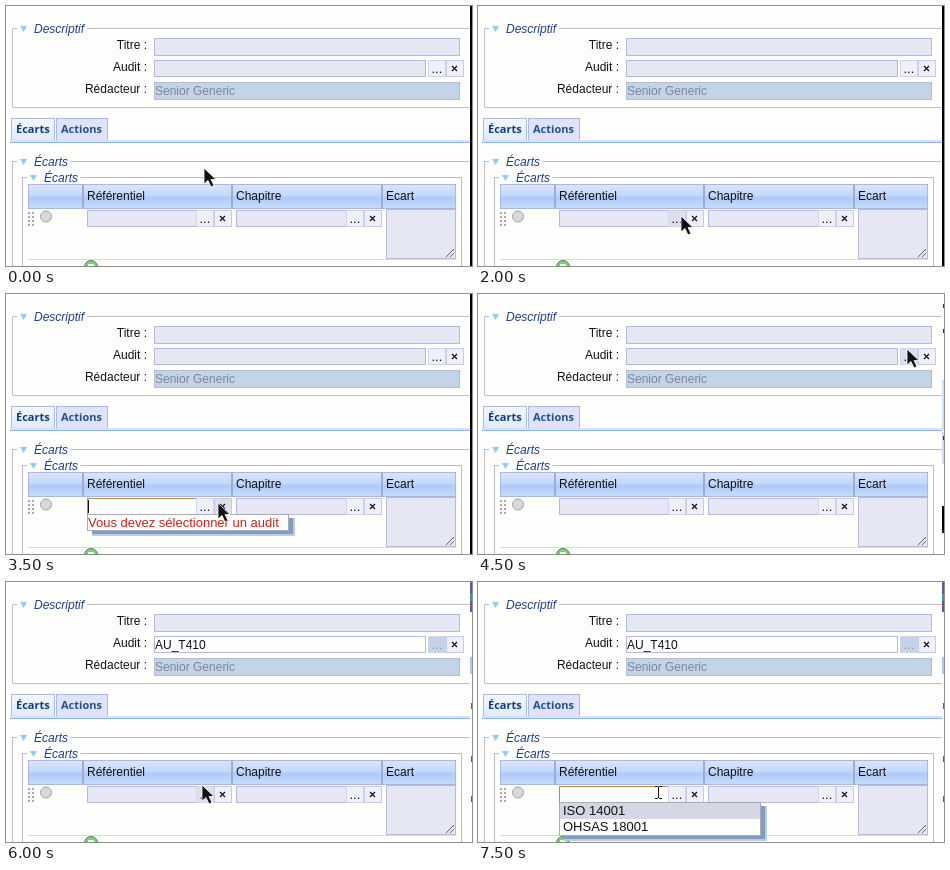
Animation, 466 px wide and 260 px high, one loop 8000 ms. Source, as an HTML page:

```html
<!DOCTYPE html>
<html lang="fr">
<head>
<meta charset="utf-8">
<title>Formulaire d'audit</title>
<style>
html, body { margin: 0; width: 100%; height: 100%; overflow: hidden; background: #fefefd; }
svg { display: block; width: 466px; height: 260px; font: 12px "Liberation Sans", Arial, sans-serif; }
text { white-space: pre; }
.tab { font: bold 11px "Open Sans", sans-serif; }
.legend { font-style: italic; paint-order: stroke; stroke: #fefefd; stroke-width: 5px; }
.big { font-size: 13px; }
</style>
</head>
<body>
<svg id="stage" viewBox="0 0 466 260" xmlns="http://www.w3.org/2000/svg">
  <defs>
    <linearGradient id="head" x2="0" y2="1">
      <stop offset="0" stop-color="#dfe4fb"/>
      <stop offset=".45" stop-color="#c3d8fa"/>
      <stop offset=".55" stop-color="#aecbf6"/>
      <stop offset="1" stop-color="#c6dcfb"/>
    </linearGradient>
    <linearGradient id="tab" x2="0" y2="1">
      <stop offset="0" stop-color="#f3f7ff"/>
      <stop offset="1" stop-color="#dcecfc"/>
    </linearGradient>
  </defs>
</svg>
<script>
const LOOP = 8000, STEP = 500;
const FIELD = '#e6e7f5', LOCKED = '#c3d4e6', BUTTON = '#f0f0fc', HOVER = '#dcdff0';
const EDGE = '#b6b9dc', PAGE = '#fefefd';
const stage = document.getElementById('stage');

function add(tag, attrs, parent = stage, content = '') {
  const el = document.createElementNS(stage.namespaceURI, tag);
  for (const key in attrs) el.setAttribute(key, attrs[key]);
  el.textContent = content;
  parent.append(el);
  return el;
}
const set = (el, attrs) => { for (const key in attrs) el.setAttribute(key, attrs[key]); };
const show = (el, on) => el.setAttribute('visibility', on ? 'visible' : 'hidden');
const group = () => add('g', {});
const path = (d, attrs, parent) => add('path', { d, fill: 'none', ...attrs }, parent);
const fill = (x, y, width, height, color, parent) => add('rect', { x, y, width, height, fill: color }, parent);
const box = (x, y, w, h, color, edge = EDGE, parent) =>
  add('rect', { x: x + .5, y: y + .5, width: w - 1, height: h - 1, fill: color, stroke: edge }, parent);
const text = (x, y, str, attrs = {}, parent) => add('text', { x, y, fill: '#111', ...attrs }, parent, str);

function fieldset(x, y, right, bottom, title) {
  box(x, y, right - x, bottom - y, 'none', '#bcbecb');
  fill(x + 5, y - 2, 18, 5, PAGE);
  path(`M${x + 8} ${y - 2}h7l-3.500 6z`, { fill: '#8fcdf0' });
  text(x + 22, y + 5, title, { class: 'legend', fill: '#1f3c90' });
}

// Search input followed by its "open" and "clear" buttons.
function picker(x, y, width, buttonX) {
  const input = box(x, y, width, 17, FIELD);
  const open = box(buttonX, y, 18, 17, BUTTON, '#d2d4ec');
  const dots = text(buttonX + 3.5, y + 13, '...', { class: 'big' });
  const clear = box(buttonX + 18, y, 18, 17, BUTTON, '#c6c9e8');
  path(`M${buttonX + 24} ${y + 6}l5 5m0 -5l-5 5`, { stroke: '#111', 'stroke-width': 1.2 });
  return { input, open, dots, clear };
}

fill(0, 0, 466, 260, PAGE);

fieldset(6, 22, 480, 102, 'Descriptif');
[['Titre :', 43], ['Audit :', 65], ['Rédacteur :', 87]].forEach(([label, y]) =>
  text(141, y, label, { 'text-anchor': 'end' }));
box(148, 32, 306, 18, FIELD);
const audit = picker(148, 54, 272, 422);
const auditValue = text(149, 67, 'AU_T410');
box(148, 76, 306, 18, LOCKED);
text(149, 89, 'Senior Generic', { fill: '#7f8794' });

box(5, 112, 44, 24, 'url(#tab)', '#a9bbe0');
box(50, 112, 52, 24, '#dfe2fb', '#a9bbe0');
text(10, 127, 'Écarts', { class: 'tab', fill: '#173a7c' });
text(55, 127, 'Actions', { class: 'tab', fill: '#23508c' });
fill(4, 134, 460, 2, '#d3e4fb');
fill(4, 136, 460, 1, '#8fb6ee');

fieldset(6, 155, 480, 270, 'Écarts');
fieldset(16, 171, 456, 270, 'Écarts');
box(22, 178, 428, 25, 'url(#head)', '#a8b8e6');
for (const x of [77, 226, 376]) fill(x - 1, 179, 2, 23, '#9badd8');
[[81, 'Référentiel'], [230, 'Chapitre'], [380, 'Ecart']].forEach(([x, label]) => text(x, 194, label));
fill(22, 253, 428, 1, '#d6dced');
for (let i = 0; i < 8; i++) fill(22 + i % 2 * 4, 206 + (i >> 1) * 4, 2, 2, '#a8a8ae');
add('circle', { cx: 40, cy: 210.5, r: 5.5, fill: '#d8d8d8', stroke: '#a2a2a2' });
const ref = picker(81, 204, 110, 190);
picker(230, 204, 111, 340);
box(380, 203, 70, 50, FIELD);
path('M440 251l8-8m-4 8l4-4', { stroke: '#60646c' });
add('circle', { cx: 85, cy: 261, r: 6.5, fill: '#86c97a', stroke: '#438b48' });
fill(82, 258, 6, 2, '#edf8ed');

const caret = fill(82, 206, 1, 13, '#111');

function popup(height) {
  const g = group();
  fill(86, 224, 203, height + 1, '#bccbe6', g);
  fill(86, 224, 201, height - 1, '#809cc4', g);
  box(81, 220, 202, height, '#fefefe', '#a9abb6', g);
  return g;
}
const warning = popup(17);
text(82, 233, 'Vous devez sélectionner un audit', { class: 'big', fill: '#c4241a' }, warning);
const searching = popup(17);
text(82, 233, 'searching...', { class: 'big', fill: '#aeb8b8' }, searching);
const list = popup(34);
fill(82, 221, 200, 16, '#d3d8e4', list);
text(85, 233, 'ISO 14001', { class: 'big' }, list);
text(85, 249, 'OHSAS 18001', { class: 'big' }, list);

// Sliver of the neighbouring window at the right edge.
fill(464, 0, 2, 260, '#fdfdfd');
const sliver = group();
fill(464, 86, 2, 50, '#cfe2f5', sliver);
fill(464, 138, 2, 32, '#d9d9f7', sliver);
for (const y of [10, 35, 142]) fill(465, y, 1, 4, '#333', sliver);
fill(464, 212, 2, 27, '#000', sliver);
const marks = group();
fill(464, 0, 2, 30, '#71539b', marks);
fill(464, 12, 2, 7, '#3d9d91', marks);
fill(464, 75, 2, 17, '#a9cbed', marks);
for (const y of [121, 174, 214]) fill(465, y, 1, 6, '#4669a5', marks);
const edge = fill(464, 0, 2, 260, '#000');

const arrow = path('M0 0v16l4-3.500 3 6.500 3-1.500-3-6h5z', {
  fill: '#111', stroke: '#fff', 'stroke-width': .8
});
const beam = path('M-3.500-5.500h2.500l1 1 1-1h2.500M0-5v11M-3.500 6.500h2.500l1-1 1 1h2.500', { stroke: '#111' });

// Pointer stops: time, x, y. It travels straight between them.
const stops = [
  [0, 198, 162], [1000, 198, 162], [2000, 203, 210], [2500, 203, 210], [3500, 212, 209],
  [4500, 429, 55], [5000, 429, 55], [6000, 196, 203], [6500, 196, 203], [7500, 180.5, 210]
];
function pointerAt(time) {
  const next = stops.findIndex(([t]) => t > time);
  if (next < 0) return stops.at(-1).slice(1);
  const [t0, x0, y0] = stops[next - 1], [t1, x1, y1] = stops[next];
  const k = (time - t0) / (t1 - t0);
  return [x0 + (x1 - x0) * k, y0 + (y1 - y0) * k];
}

// Each scene lasts until the next start time.
const scenes = [
  { at: 0, edge: true },
  { at: 2000, edge: true, hover: 'open' },
  { at: 2500, menu: warning, hover: 'open' },
  { at: 3000, menu: warning, hover: 'open', edge: true },
  { at: 3500, menu: warning, hover: 'clear', edge: true },
  { at: 4000 },
  { at: 4500, hover: 'audit' },
  { at: 5000, chosen: true },
  { at: 6000, chosen: true, hover: 'open' },
  { at: 6500, chosen: true, pressed: true, menu: searching },
  { at: 7000, chosen: true, menu: list },
  { at: 7500, chosen: true, menu: list, typing: true }
];

function draw(now) {
  const time = Math.floor(now % LOOP / STEP) * STEP;
  const s = scenes.findLast(scene => scene.at <= time);
  const { menu, hover, chosen } = s;
  for (const m of [warning, searching, list]) show(m, m === menu);
  set(ref.input, { fill: menu ? '#fefefe' : FIELD, stroke: menu ? '#b98a4c' : EDGE });
  set(ref.open, { fill: s.pressed ? '#f0ed45' : hover === 'open' ? HOVER : BUTTON });
  set(ref.clear, { fill: hover === 'clear' ? HOVER : BUTTON });
  show(caret, menu && menu !== list);
  set(audit.input, { fill: chosen ? '#fefefe' : FIELD });
  set(audit.open, { fill: chosen ? LOCKED : hover === 'audit' ? HOVER : BUTTON });
  set(audit.dots, { fill: chosen ? '#8d94a2' : '#111' });
  show(auditValue, chosen);
  show(edge, s.edge);
  show(sliver, !chosen);
  show(marks, chosen);
  const transform = `translate(${pointerAt(time)})`;
  for (const pointer of [arrow, beam]) {
    show(pointer, (pointer === beam) === !!s.typing);
    set(pointer, { transform });
  }
}

const start = performance.now();
function tick() {
  draw(performance.now() - start);
  requestAnimationFrame(tick);
}
tick();
</script>
</body>
</html>
```
